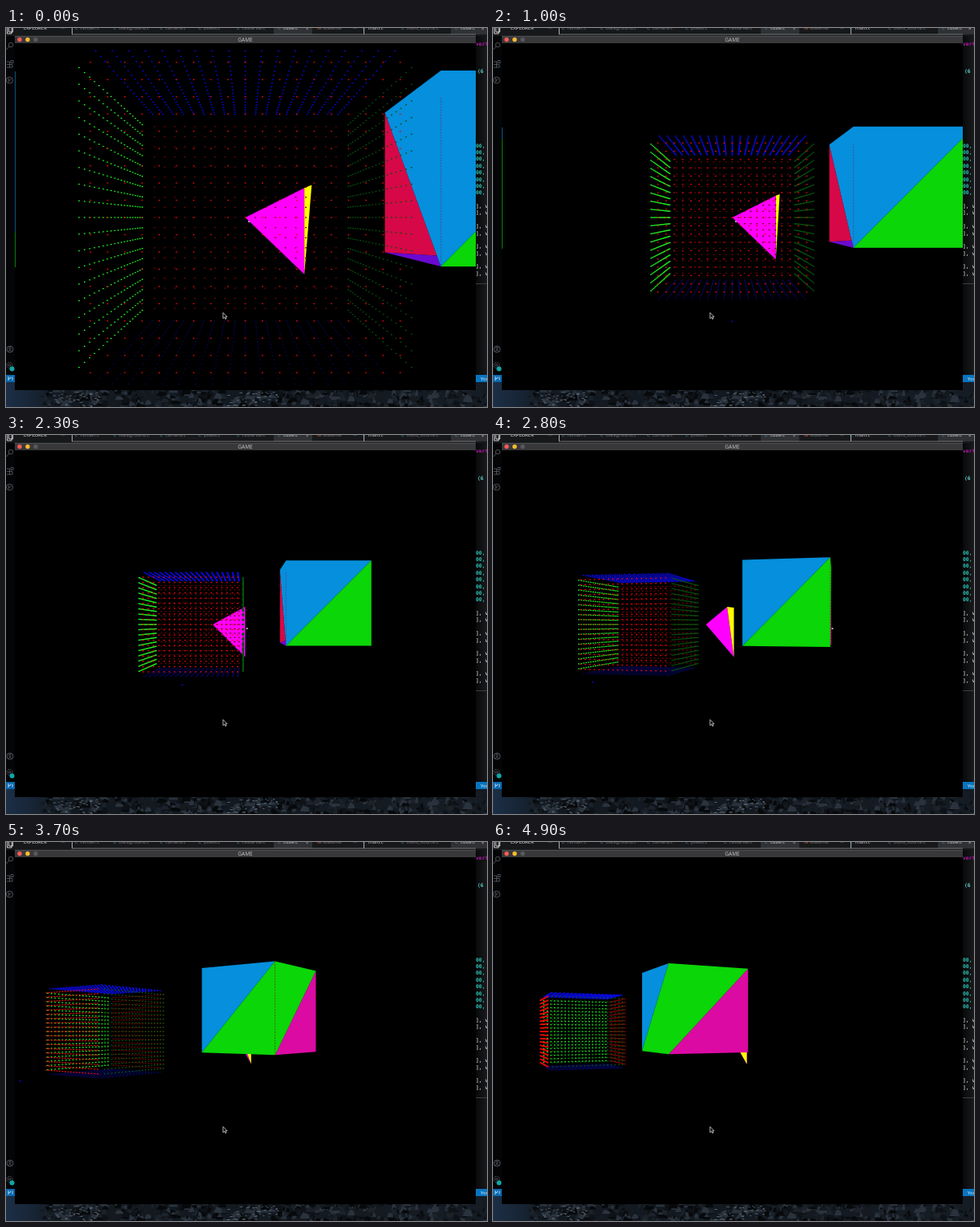
Recreate the animation shown at these times as an HTML page with a canvas. Size 600x472 px, loop 5 s.

```html
<!DOCTYPE html>
<html lang="en">
<head>
<meta charset="utf-8">
<title>Game</title>
<style>
  html, body { margin: 0; width: 100%; height: 100%; overflow: hidden; background: #050608; }
  #stage { position: relative; width: 600px; height: 472px; overflow: hidden; }
  #stage > * { position: absolute; left: 0; top: 0; }
  #stage > #game { left: 11px; top: 19px; }
  svg text { font-family: "Open Sans", Lato, sans-serif; }
  svg .code { font-family: "DejaVu Sans Mono", monospace; font-size: 6.4px; font-weight: bold; }
</style>
</head>
<body>
<div id="stage">
  <canvas id="rocks" width="600" height="472"></canvas>
  <svg id="desk" width="600" height="472" viewBox="0 0 600 472">
    <defs>
      <linearGradient id="shade"><stop stop-color="#08090a"/><stop offset="1" stop-color="#181a1c"/></linearGradient>
    </defs>
    <rect width="11" height="432" fill="#040506"/>
    <rect x="586" width="14" height="432" fill="url(#shade)"/>
    <path d="M586 318.5h14" stroke="#3c3d40"/>
    <rect width="600" height="10" fill="#17181a"/>
    <rect x="334" width="48" height="8" fill="#303135"/>
    <rect x="555" width="45" height="8" fill="#303135"/>
    <path d="M82.5 0v8M446.5 0v8" stroke="#b0b0b2"/>
    <path d="M82 8h504" stroke="#77787b"/>
    <g id="tabs" font-size="6"></g>
    <g fill="none" stroke="#55585d" stroke-width=".9">
      <path d="M1.500 0v7h5.500v-7M3.500 0v5h5v-5" stroke="#e4e4e4"/>
      <circle cx="6" cy="21" r="2.800"/><path d="M4 23l-3.500 4"/>
      <path d="M1 42h3.500v7h-3.500M1 45.500h7v3.500h-4M6 40.500h3v3h-3z"/>
      <circle cx="4.500" cy="65" r="4"/><path d="M3.500 62.500v5M3.500 66l3-2.500"/>
      <circle cx="5" cy="400" r="4"/><circle cx="5" cy="398.700" r="1.400"/><path d="M2.500 403q2.500-3.500 5 0"/>
      <circle cx="4.500" cy="420" r="3.600" stroke-dasharray="2 .8"/><circle cx="4.500" cy="420" r="1.400"/>
    </g>
    <circle cx="7.500" cy="424.500" r="3" fill="#13a5a5"/>
    <rect y="432" width="11" height="9" fill="#0868b0"/>
    <rect x="586" y="432" width="14" height="9" fill="#0875c0"/>
    <path d="M3 434v5M3 437q3 0 3-2.500M8 434.500v4" stroke="#e8f2fa" stroke-width=".8" fill="none"/>
    <text x="592" y="438.500" font-size="6" fill="#e8f2fa">You</text>
    <g id="code"></g>
    <rect x="11" y="10" width="575" height="441" fill="#000"/>
    <rect x="11" y="10" width="575" height="9" fill="#38383b"/>
    <path d="M11 10.300h575" stroke="#6b6b70" stroke-width=".6"/>
    <circle cx="17" cy="14.500" r="2.700" fill="#fb5b54"/>
    <circle cx="27" cy="14.500" r="2.700" fill="#f8bb2e"/>
    <circle cx="37" cy="14.500" r="2.700" fill="#59595d"/>
    <text x="298.500" y="17" font-size="6.500" fill="#c4c4c6" text-anchor="middle">GAME</text>
  </svg>
  <canvas id="game" width="575" height="432"></canvas>
  <svg width="600" height="472" viewBox="0 0 600 472">
    <path d="M270.800 354.500v7.200l1.700-1.500 1.100 2.400 1.200-.5-1.100-2.400h2.200z" fill="#000" stroke="#ddd" stroke-width=".8"/>
  </svg>
</div>
<script>
const $ = id => document.getElementById(id);

// ---- desktop behind the window ----
function label(group, x, y, text, fill, cls) {
  const el = document.createElementNS('http://www.w3.org/2000/svg', 'text');
  el.setAttribute('x', x);
  el.setAttribute('y', y);
  el.setAttribute('fill', fill);
  if (cls) el.setAttribute('class', cls);
  el.textContent = text;
  $(group).append(el);
}

label('tabs', 22, 2.4, 'EXPLORER', '#eee');
label('tabs', 69, 2, '···', '#aaa');
[[93, 'render.c'], [141, 'background.c'], [199, 'camera.c'], [247, 'pixels.c'],
 [295, 'rasterise.c'], [346, 'cube.c', 1], [395, 'Makefile'], [452, 'main.c', 1],
 [500, 'build_source.c'], [567, 'cube.c', 1]].forEach(([x, name, lit]) => {
  const make = name === 'Makefile';
  label('tabs', x - 7, 2.4, make ? 'M' : 'C', make ? '#d0683c' : '#4696bd');
  label('tabs', x, 2.4, name, lit ? '#d8d8d8' : '#77797d');
});
label('tabs', 374, 3, '×', '#aaa');
label('tabs', 433, 2, '···', '#aaa');
label('tabs', 593, 3, '×', '#ccc');

label('code', 586, 22, 'vert', '#b316a8', 'code');
label('code', 588, 55.5, '(6', '#5fc8c4', 'code');
for (let i = 0; i < 8; i++) label('code', 586, 148.5 + i * 8.42, '00,', '#2cc4b8', 'code');
[223.5, 232, 249, 257.5, 274, 282.5, 299, 307.5]
  .forEach(y => label('code', 586, y, '], v', '#b4babf', 'code'));

function drawRocks() {
  const c = $('rocks').getContext('2d');
  let seed = 11;
  const rnd = () => (seed = (seed * 16807) % 2147483647) / 2147483647;
  const sea = c.createLinearGradient(0, 0, 600, 0);
  sea.addColorStop(0, '#1c2f47');
  sea.addColorStop(.12, '#12181f');
  sea.addColorStop(1, '#151c24');
  c.fillStyle = sea;
  c.fillRect(0, 441, 600, 31);
  const tones = ['#07090b', '#0e1217', '#1b222a', '#2a333d', '#141a20'];
  for (let i = 0; i < 650; i++) {
    const x = 45 + rnd() * 555, y = 446 + rnd() * 28, w = 1.5 + rnd() * 5, h = 1 + rnd() * 4;
    c.fillStyle = tones[rnd() * tones.length | 0];
    c.beginPath();
    c.moveTo(x - w, y + h);
    c.lineTo(x - w * .3, y - h);
    c.lineTo(x + w * .7, y - h * .4);
    c.lineTo(x + w, y + h);
    c.fill();
  }
  c.fillStyle = '#65717d';
  for (let i = 0; i < 90; i++) {
    const x = (i % 2 ? 50 : 275) + rnd() * 65;
    c.fillRect(x, 453 + rnd() * 18, 1 + rnd() * 3, .8);
  }
}
drawRocks();

// ---- 3D scene ----
const ctx = $('game').getContext('2d');
const FOCAL = 607.6, MX = 298.5, MY = 236, RIGHT = 586;
const BLUE = '#058fdc', GREEN = '#0bd607', CRIMSON = '#d60848',
      PINK = '#db0aa3', PURPLE = '#6a0ad0';
const cam = { x: 0, z: 0, sin: 0, cos: 1, yaw: 0 };

// backward dolly: seconds, distance
const dolly = [[0, 38.3], [.5, 52.6], [1.6, 88.5], [2.13, 102.7]];

function along(keys, t) {
  for (let i = 1; i < keys.length; i++) {
    const [t0, a] = keys[i - 1], [t1, b] = keys[i];
    if (t < t1) return a + (b - a) * (t - t0) / (t1 - t0);
  }
  return keys[keys.length - 1][1];
}

// dolly back, strafe right, then strafe while turning left
function setCamera(t) {
  const yaw = Math.max(0, t - 2.3) * 24.15 * Math.PI / 180;
  cam.yaw = yaw;
  cam.sin = Math.sin(yaw);
  cam.cos = Math.cos(yaw);
  cam.x = Math.min(Math.max(0, t - 2.13) * 61.5, 10.45) + 147.7 * cam.sin;
  cam.z = -along(dolly, t) + 143 * (1 - cam.cos);
}

const depth = (x, z) => (z - cam.z) * cam.cos - (x - cam.x) * cam.sin;

function project([x, y, z]) {
  const d = depth(x, z);
  const side = (x - cam.x) * cam.cos + (z - cam.z) * cam.sin;
  return [MX + FOCAL * side / d, MY + FOCAL * y / d];
}

function poly(color, ...pts) {
  ctx.beginPath();
  pts.forEach(p => ctx.lineTo(p[0], p[1]));
  ctx.closePath();
  ctx.fillStyle = color;
  ctx.fill();
}

const mix = (a, b, k) => [a[0] + (b[0] - a[0]) * k, a[1] + (b[1] - a[1]) * k];

function seam(a, b, color) {
  ctx.beginPath();
  ctx.moveTo(a[0], a[1]);
  ctx.lineTo(b[0], b[1]);
  ctx.setLineDash([2, 1.5]);
  ctx.lineWidth = 1;
  ctx.strokeStyle = color;
  ctx.stroke();
}

function dot(p, color, w, h) {
  const [x, y] = project(p);
  ctx.fillStyle = color;
  ctx.fillRect(x - w / 2, y - h / 2, w, h);
}

function drawPyramid() {
  const [a, b, c, d] = [[0, 0, 53], [10.4, -5.2, 47.5], [10.4, 10, 47.5], [10.4, -5.1, 38]].map(project);
  if (cam.x < 10.4) {
    poly('#ff0', b, d, c);
    poly('#f0f', a, b, c);
  } else {
    poly('#f0f', a, d, c);
    poly('#ff0', b, d, c);
  }
}

function drawCube() {
  const T = -15, B = 5, N = 11.5, F = 31.5;
  const edge = (x, z) => [project([x, T, z]), project([x, B, z])];
  const [tl, bl] = edge(20, N), [tr, br] = edge(40, N);
  const leftSide = cam.x < 20, rightSide = cam.x > 40;
  const [ft, fb] = edge(rightSide ? 40 : 20, F);

  // each colour runs on around the corner as one shape
  if (leftSide) {
    const cut = mix(ft, bl, .93);
    poly(CRIMSON, ft, fb, cut);
    poly(PURPLE, fb, bl, cut);
    poly(BLUE, ft, tl, tr, bl);
  } else poly(BLUE, tl, tr, bl);
  if (rightSide) {
    poly(PINK, ft, fb, br);
    poly(GREEN, tr, ft, br, bl);
  } else poly(GREEN, tr, br, bl);

  if (leftSide) seam(mix(tl, bl, .14), bl, 'rgba(120,40,110,.6)');
  else if (rightSide && cam.yaw < .6) seam(tr, br, 'rgba(90,70,10,.8)');

  // the clipped right column spills onto the left border
  if (tr[0] > RIGHT && tl[0] < RIGHT) {
    const split = mix(bl, tr, (RIGHT - tl[0]) / (tr[0] - tl[0]))[1];
    ctx.globalAlpha = .6;
    ctx.fillStyle = BLUE;
    ctx.fillRect(11, tl[1] + 1, 1, split - tl[1]);
    ctx.fillStyle = GREEN;
    ctx.fillRect(11, split + 1, 1, bl[1] - split);
    ctx.globalAlpha = 1;
  }
}

// walls of the dotted room: colour, centre, grid point
const walls = [
  ['#e80808', [0, -10], (u, v) => [u, v, -10]],
  ['#6e0606', [0, 10], (u, v) => [u, v, 10]],
  ['#22e822', [-10, 0], (u, v) => [-10, u, v]],
  ['#07500e', [10, 0], (u, v) => [10, u, v]],
  ['#0a0ae0', [0, 0], (u, v) => [u, -10, v]],
  ['#060648', [0, 0], (u, v) => [u, 10, v]]
];

function drawRoom() {
  const far = w => depth(w[1][0], w[1][1]);
  [...walls].sort((a, b) => far(b) - far(a)).forEach(([color, , at]) => {
    for (let u = -9; u <= 9; u++)
      for (let v = -9; v <= 9; v++) dot(at(u, v), color, 1.9, 1.3);
  });
}

function draw(t) {
  setCamera(t);
  ctx.setTransform(1, 0, 0, 1, 0, 0);
  ctx.fillStyle = '#000';
  ctx.fillRect(0, 0, 575, 432);
  ctx.translate(-11, -19);
  dot([20, 22, 2600], '#eee', 1.8, 1.6);
  drawPyramid();
  drawCube();
  drawRoom();
  dot([0, 10, -22], '#0808b0', 2.4, 1.6);
}

const LOOP = 5000, STEP = 100;
const start = performance.now();
let shown = -1;
function tick() {
  const step = Math.floor(Math.max(0, performance.now() - start) % LOOP / STEP);
  if (step !== shown) draw((shown = step) * STEP / 1000);
  requestAnimationFrame(tick);
}
tick();
</script>
</body>
</html>
```
